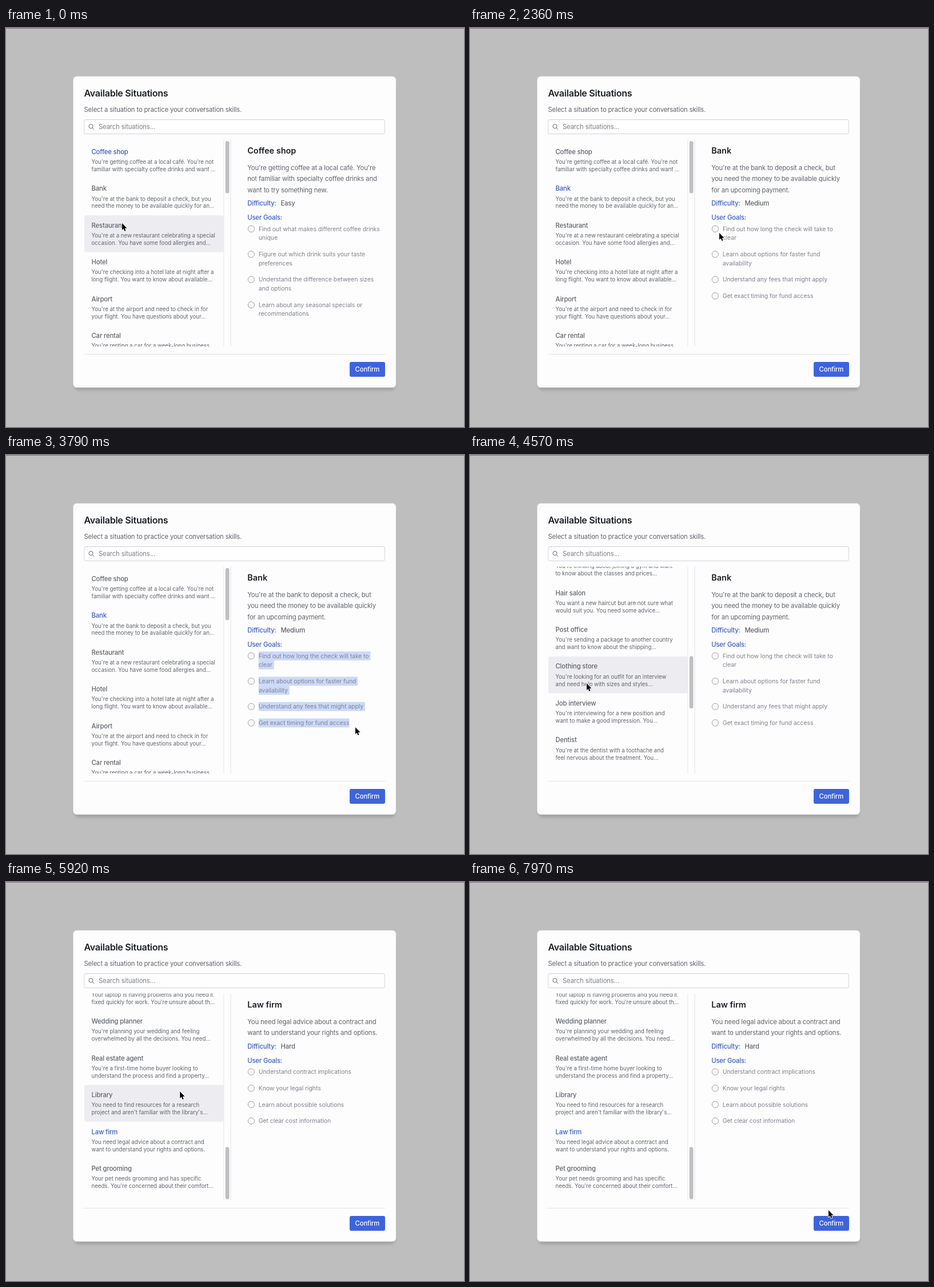
Write an HTML page with a canvas that moves like this. It is 801 px wide and 699 px high and loops after 8 s.

```html
<!DOCTYPE html>
<html lang="en">
<head>
<meta charset="utf-8">
<title>Available Situations</title>
<style>
html, body { margin: 0; width: 100%; height: 100%; overflow: hidden; background: #bebebe; }
canvas { display: block; width: 801px; height: 699px; }
</style>
</head>
<body>
<canvas id="stage"></canvas>
<script>
const W = 801, H = 699, LOOP = 8000;
const canvas = document.getElementById('stage');
const ctx = canvas.getContext('2d');
const dpr = window.devicePixelRatio || 1;
canvas.width = W * dpr;
canvas.height = H * dpr;

const INK = '#1c2024', GRAY = '#60646c', SOFT = '#80838d', BLUE = '#3a5bc7';
const LINE = '#e2e3e6', SELECT = '#cbd9f9';

// weight, size, letter spacing
const TITLE = [600, 16.1, -0.28], HEAD = [600, 14.5, -0.02];
const BODY = [400, 11.28, -0.12], BOLD = [500, 11.28, -0.14];
const SMALL = [400, 9.67, -0.01], GOAL = [400, 10.48, -0.06];

const ROWS = [
  ['Coffee shop', "You're getting coffee at a local café. You're not", 'familiar with specialty coffee drinks and want …'],
  ['Bank', "You're at the bank to deposit a check, but you", 'need the money to be available quickly for an…'],
  ['Restaurant', "You're at a new restaurant celebrating a special", 'occasion. You have some food allergies and…'],
  ['Hotel', "You're checking into a hotel late at night after a", 'long flight. You want to know about available…'],
  ['Airport', "You're at the airport and need to check in for", 'your flight. You have questions about your…'],
  ['Car rental', "You're renting a car for a week-long business", 'trip. You want to understand the insurance…'],
  ['Doctor', "You're visiting a doctor about a cough that", "won't go away. You want to know what…"],
  ['Pharmacy', "You're picking up a prescription and have", 'questions about how to take it and any…'],
  ['Grocery store', "You're shopping for a dinner party and can't", 'find several ingredients. You need help…'],
  ['Gym', "You're thinking about joining a gym and want", 'to know about the classes and prices…'],
  ['Hair salon', 'You want a new haircut but are not sure what', 'would suit you. You need some advice…'],
  ['Post office', "You're sending a package to another country", 'and want to know about the shipping…'],
  ['Clothing store', "You're looking for an outfit for an interview", 'and need help with sizes and styles…'],
  ['Job interview', "You're interviewing for a new position and", 'want to make a good impression. You…'],
  ['Dentist', "You're at the dentist with a toothache and", 'feel nervous about the treatment. You…'],
  ['Auto repair', 'Your car is making a strange noise and you', 'need it for work. You want to know the…'],
  ['Computer repair', 'Your laptop is having problems and you need it', "fixed quickly for work. You're unsure about th…"],
  ['Wedding planner', "You're planning your wedding and feeling", 'overwhelmed by all the decisions. You need…'],
  ['Real estate agent', "You're a first-time home buyer looking to", 'understand the process and find a property…'],
  ['Library', 'You need to find resources for a research', "project and aren't familiar with the library's…"],
  ['Law firm', 'You need legal advice about a contract and', 'want to understand your rights and options.'],
  ['Pet grooming', 'Your pet needs grooming and has specific', "needs. You're concerned about their comfort…"]
];

const DETAILS = {
  0: {
    about: ["You're getting coffee at a local café. You're", 'not familiar with specialty coffee drinks and', 'want to try something new.'],
    level: 'Easy',
    goals: [['Find out what makes different coffee drinks', 'unique'], ['Figure out which drink suits your taste', 'preferences'],
      ['Understand the difference between sizes', 'and options'], ['Learn about any seasonal specials or', 'recommendations']]
  },
  1: {
    about: ["You're at the bank to deposit a check, but", 'you need the money to be available quickly', 'for an upcoming payment.'],
    level: 'Medium',
    goals: [['Find out how long the check will take to', 'clear'], ['Learn about options for faster fund', 'availability'],
      ['Understand any fees that might apply'], ['Get exact timing for fund access']]
  },
  20: {
    about: ['You need legal advice about a contract and', 'want to understand your rights and options.'],
    level: 'Hard',
    goals: [['Understand contract implications'], ['Know your legal rights'], ['Learn about possible solutions'], ['Get clear cost information']]
  }
};

const LIST = { x: 136.8, right: 381, top: 195.5, bottom: 558, first: 199.2, pitch: 64.48, maxScroll: 1068.8 };

// pointer path: time, x, y
const PATH = [
  [0, 203, 342], [60, 203, 342], [630, 227, 296], [1540, 227, 296], [1590, 229, 293.5], [1630, 230, 293],
  [2360, 436, 359], [2400, 436, 359], [3130, 635, 488], [3400, 635, 488], [3790, 611, 477], [4110, 611, 477],
  [4250, 420, 372], [4390, 204, 400], [5060, 204, 400], [5220, 203, 454], [5580, 203, 454], [6270, 409, 277],
  [6330, 409, 277], [6390, 413, 284], [6730, 516, 289], [6860, 516, 289], [6960, 462, 299], [7080, 411, 300],
  [7150, 411, 300], [7690, 594, 500], [7715, 594, 500], [7970, 627, 575], [8000, 627, 575]
];

// zero slope next to a pause, otherwise the slope between neighbours
function slope(i, k) {
  const a = PATH[i - 1], b = PATH[i], c = PATH[i + 1];
  if (!a || !c || (a[1] === b[1] && a[2] === b[2]) || (c[1] === b[1] && c[2] === b[2])) return 0;
  return (c[k] - a[k]) / (c[0] - a[0]);
}

function pointerAt(t) {
  let i = 0;
  while (i < PATH.length - 2 && t >= PATH[i + 1][0]) i++;
  const a = PATH[i], b = PATH[i + 1], d = b[0] - a[0], u = (t - a[0]) / d;
  const s = u * u * (3 - 2 * u);
  const [x, y] = [1, 2].map(k => a[k] + (b[k] - a[k]) * s
    + d * u * (1 - u) * ((1 - u) * slope(i, k) - u * slope(i + 1, k)));
  return { x, y };
}

function setFont([weight, size, spacing]) {
  ctx.font = `${weight} ${size}px Inter, sans-serif`;
  ctx.letterSpacing = spacing + 'px';
}

// y is the centre of the line
function text(str, x, y, style, color) {
  setFont(style);
  ctx.fillStyle = color;
  ctx.fillText(str, x, y + style[1] * 0.356);
}

function widthOf(str, style) {
  setFont(style);
  return ctx.measureText(str).width;
}

function rect(x, y, w, h, color, r = 0) {
  ctx.fillStyle = color;
  ctx.beginPath();
  ctx.roundRect(x, y, w, h, r);
  ctx.fill();
}

function ring(x, y, r, color, width) {
  ctx.beginPath();
  ctx.arc(x, y, r, 0, Math.PI * 2);
  ctx.strokeStyle = color;
  ctx.lineWidth = width;
  ctx.stroke();
}

function drawDialog() {
  rect(0, 0, W, H, '#bebebe');
  rect(0, 0, W, 1, '#866f88');
  ctx.save();
  ctx.shadowColor = 'rgba(0,0,0,0.16)';
  ctx.shadowBlur = 5 * dpr;
  ctx.shadowOffsetY = 5.5 * dpr;
  rect(119.5, 88, 561, 541, '#fdfdfe', 7);
  ctx.restore();
  rect(117, 84.3, 565.5, 546, '#d3d3d5', 6.5);
  rect(117.8, 85.1, 563.9, 544.4, '#fdfdfe', 6);

  text('Available Situations', 136.5, 114.5, TITLE, INK);
  text('Select a situation to practice your conversation skills.', 136.5, 142.5, BODY, GRAY);

  rect(136.3, 160, 526.7, 26, '#d0d2d8', 4);
  rect(137.2, 160.9, 524.9, 24.2, '#fefefe', 3.2);
  ring(148.5, 172.2, 3.6, GRAY, 1);
  ctx.beginPath();
  ctx.moveTo(151.2, 174.9);
  ctx.lineTo(154, 177.7);
  ctx.stroke();
  text('Search situations...', 162, 173, BODY, '#7d8089');

  rect(136.5, 571, 526.5, 1, LINE);
  rect(601, 585, 62, 26, '#3e63dd', 3);
  text('Confirm', 610.6, 598, BOLD, '#fff');
}

function drawList(scroll, picked, p) {
  const { x, right, top, bottom, first, pitch, maxScroll } = LIST;
  const inside = p.x >= x && p.x < right && p.y > top && p.y < bottom;
  const hover = inside ? Math.floor((p.y - first + scroll) / pitch) : -1;
  ctx.save();
  ctx.beginPath();
  ctx.rect(x, top, right - x + 1, bottom - top);
  ctx.clip();
  ROWS.forEach(([name, one, two], i) => {
    const y = first + i * pitch - scroll;
    if (y + pitch < top || y > bottom) return;
    if (i === hover) rect(x, y, right - x, pitch, i === picked ? '#e9effc' : '#ededf1', 4);
    text(name, 149.5, y + 17.5, BOLD, i === picked ? BLUE : GRAY);
    text(one, 149.5, y + 35.4, SMALL, GRAY);
    text(two, 149.5, y + 48.3, SMALL, GRAY);
  });
  ctx.restore();
  rect(380.3, top, 1, bottom - top, '#e6e7ea');
  rect(392.5, top, 1, bottom - top, LINE);
  rect(383.8, 198 + 266.3 * scroll / maxScroll, 6.6, 91.6, '#bfbfc1', 3.3);
}

function drawDetail(picked, p, t) {
  const { about, level, goals } = DETAILS[picked], x = 422.2;
  text(ROWS[picked][0], x, 215, HEAD, INK);
  about.forEach((line, i) => text(line, x, 245 + i * 19.4, BODY, GRAY));

  let y = 248.9 + about.length * 19.35;
  if (t >= 6390 && t < 7140) {
    const end = t < 6730 ? p.x : 999;
    [['Difficulty: ', x], [level, 480.4]].forEach(([str, left]) => {
      const w = Math.min(widthOf(str, BOLD), end - left);
      if (w > 0) rect(left, y - 7.8, w, 15.6, SELECT);
    });
  }
  text('Difficulty:', x, y, BOLD, BLUE);
  text(level, 480.4, y, BOLD, GRAY);
  text('User Goals:', x, y + 25, BOLD, BLUE);

  y += 45;
  const dragging = t >= 2450 && t < 3970, released = t > 3130;
  goals.forEach((lines, g) => {
    ring(428.9, y, 5.6, '#8f919b', 0.9);
    lines.forEach((line, i) => {
      const ly = y + i * 15.7, left = 441.7;
      if (dragging && (released || p.y >= ly - 7.8)) {
        const full = widthOf(line, GOAL) + (g < goals.length - 1 ? 2.8 : 0);
        const done = released || p.y >= ly + 7.8;
        const w = done ? full : Math.max(0, Math.min(full, p.x - left));
        rect(left, ly - 7.8, w, 15.7, SELECT);
      }
      text(line, left, ly, GOAL, SOFT);
    });
    y += 28.65 + (lines.length - 1) * 15.7;
  });
}

function drawArrow() {
  const pts = [[0, 0], [0, 12], [2.7, 9.5], [4.6, 13.9], [6.5, 13.1], [4.7, 8.7], [8.5, 8.7]];
  ctx.beginPath();
  pts.forEach(([x, y]) => ctx.lineTo(x, y));
  ctx.closePath();
  ctx.lineJoin = 'round';
  ctx.strokeStyle = '#fff';
  ctx.lineWidth = 1.8;
  ctx.stroke();
  ctx.fillStyle = '#000';
  ctx.fill();
}

function drawBeam() {
  for (const [color, width] of [['rgba(255,255,255,0.8)', 2.4], ['#111', 1]]) {
    ctx.strokeStyle = color;
    ctx.lineWidth = width;
    ctx.beginPath();
    for (const s of [-1, 1]) {
      ctx.moveTo(-2.8, s * 6.2);
      ctx.quadraticCurveTo(0, s * 6.2, 0, s * 4.4);
      ctx.quadraticCurveTo(0, s * 6.2, 2.8, s * 6.2);
    }
    ctx.moveTo(0, -4.6);
    ctx.lineTo(0, 4.6);
    ctx.moveTo(-1.6, 2.6);
    ctx.lineTo(1.6, 2.6);
    ctx.stroke();
  }
}

function draw(t) {
  const p = pointerAt(t);
  const picked = t < 990 ? 0 : t < 5570 ? 1 : 20;
  const scroll = t < 4570 ? 0 : t < 4630 ? 620 : LIST.maxScroll;
  const beam = (t > 2480 && t < 2950) || (t > 6350 && t < 7060);
  ctx.setTransform(dpr, 0, 0, dpr, 0, 0);
  drawDialog();
  drawList(scroll, picked, p);
  drawDetail(picked, p, t);
  ctx.translate(p.x, p.y);
  if (beam) drawBeam();
  else drawArrow();
}

const start = performance.now();
function tick() {
  draw((performance.now() - start) % LOOP);
  requestAnimationFrame(tick);
}
tick();
</script>
</body>
</html>
```
